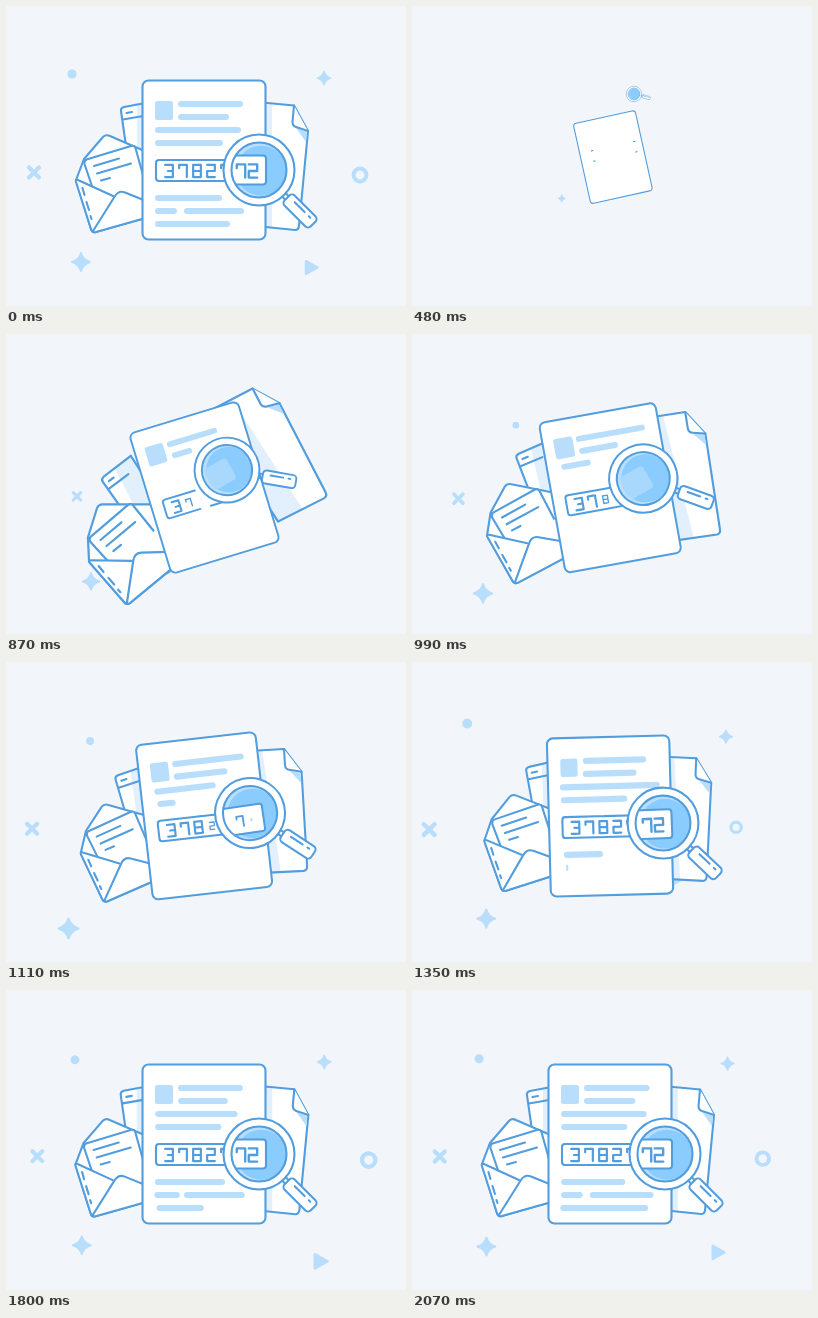
Animation, 400 px wide and 300 px high, one loop 2.1 s. Source, as an HTML page with a canvas:

```html
<!DOCTYPE html>
<html>
<head>
<meta charset="utf-8">
<style>
html, body { margin: 0; width: 100%; height: 100%; overflow: hidden; background: #f2f6fb; }
canvas { display: block; width: 400px; height: 300px; }
</style>
</head>
<body>
<canvas width="400" height="300"></canvas>
<script>
const LOOP = 2100, STAGGER = 145;
const PAPER = '#f2f6fb', BLUE = '#529dde', LIGHT = '#b9defb', SHADE = '#e2effc', GLASS = '#8accfe';
const ctx = document.querySelector('canvas').getContext('2d');
const clamp = v => Math.max(0, Math.min(1, v));

// Rises past 1, then rings out.
function spring(t, start, rise, over) {
  const v = (t - start) / rise, u = (t - start - rise) / 1000;
  if (v <= 0) return 0;
  if (v < 1) return (1 + over) * (1 - (1 - v) ** 1.4);
  return 1 + over * Math.exp(-3 * u) * Math.cos(6 * u);
}

// Soft start, then an exponential approach to 1.
const approach = (t, start, rate) => 1 - Math.exp(-rate * Math.max(0, (t - start) / 1000) ** 1.3);

// Smooth monotone curve through one value per beat.
const beats = [240, 480, 870, 1110, 1350, 1590];
function curve(t, values) {
  const last = beats.length - 1;
  if (t <= beats[0]) return values[0];
  if (t >= beats[last]) return values[last];
  const rate = k => (values[k + 1] - values[k]) / (beats[k + 1] - beats[k]);
  const slope = k => {
    if (k === 0 || k === last || rate(k - 1) * rate(k) <= 0) return 0;
    return 2 * rate(k - 1) * rate(k) / (rate(k - 1) + rate(k));
  };
  const i = beats.findIndex(b => b > t) - 1, h = beats[i + 1] - beats[i];
  const u = (t - beats[i]) / h, w = 1 - u;
  return values[i] * w * w * (1 + 2 * u) + values[i + 1] * u * u * (3 - 2 * u)
    + h * u * w * (slope(i) * w - slope(i + 1) * u);
}

const spin = t => curve(t, [-360, -193, -17, -6.5, -1.5, 0]);

// Maps the rest position (ox, oy) to (x, y), turned and scaled about it.
function place(x, y, degrees, scale, ox = 0, oy = 0) {
  const a = degrees * Math.PI / 180, c = Math.cos(a) * scale, s = Math.sin(a) * scale;
  ctx.setTransform(c, s, -s, c, x - c * ox + s * oy, y - s * ox - c * oy);
}

function shape(d, fill, stroke = BLUE, width = 2.1) {
  const path = new Path2D(d);
  if (fill) { ctx.fillStyle = fill; ctx.fill(path); }
  if (stroke) { ctx.strokeStyle = stroke; ctx.lineWidth = width; ctx.stroke(path); }
}

function rounded(x, y, w, h, r) {
  const path = new Path2D();
  path.roundRect(x, y, w, h, r);
  return path;
}

function circle(x, y, r) {
  const path = new Path2D();
  path.arc(x, y, r, 0, 7);
  return path;
}

function sparkle(x, y, r) {
  const k = r * .22;
  return `M${x} ${y - r}Q${x + k} ${y - k} ${x + r} ${y}Q${x + k} ${y + k} ${x} ${y + r}`
    + `Q${x - k} ${y + k} ${x - r} ${y}Q${x - k} ${y - k} ${x} ${y - r}Z`;
}

const ornaments = [
  () => shape(sparkle(75, 256, 9), LIGHT, LIGHT, 2),
  () => shape('M23 161.5l10 10m0-10l-10 10', null, LIGHT, 4.2),
  () => shape(circle(66, 68, 4.6), LIGHT, null),
  () => shape(sparkle(318, 72, 6.6), LIGHT, LIGHT, 1.6),
  () => shape(circle(354, 169, 6.4), null, LIGHT, 4),
  () => shape('M300 255L311.5 261.5L300 268Z', LIGHT, LIGHT, 2.5)
];

function drawOrnaments(t) {
  ornaments.forEach((paint, i) => {
    const s = spring(t, 240 + STAGGER * i, 870, .1);
    place(200, 150, 0, s, 200, 150);
    if (s) paint();
  });
}

const glyphs = {
  2: 'M-3.5-5.5H3.5V0H-3.5V5.5H3.5',
  3: 'M-3.5-5.5H3.5V5.5H-3.5M-1 0H3.5',
  7: 'M-3.5-2.5V-5.5H3.5V5.5',
  8: 'M-3.5-5.5H3.5V5.5H-3.5ZM-3.5 0H3.5'
};

function digit(t, char, x, y, start, size) {
  const s = size * clamp((t - start) / 200);
  if (!s) return;
  ctx.save();
  ctx.translate(x, y);
  ctx.scale(s, s);
  shape(glyphs[char], null, BLUE, 2);
  ctx.restore();
}

// A sheet behind the page, with the page's soft shade falling on it.
function sheet(d) {
  shape(d, '#fff', null);
  ctx.save();
  ctx.clip(new Path2D(d));
  ctx.fillStyle = SHADE;
  ctx.fillRect(131, 70, 135, 170);
  ctx.restore();
  shape(d);
}

function drawBack(t) {
  const scale = spring(t, 500, 300, .07);
  if (!scale) return;
  const trail = lag => place(198, 154, spin(t - lag), scale, 198, 154);

  trail(60);
  sheet('M150 95L118 101Q114.500 102 115 105L130 210L160 205Z');
  shape('M117 113.500L140 109.500M120.500 107L126 106');

  trail(80);
  sheet('M240 95L288 99.500L302 125L293 220Q292.500 224 289 224L240 219Z');
  shape('M290 122L301 126L300 136Z', LIGHT, null);
  shape('M288 99.500L286.500 116Q286.500 120 290 121L302 125', '#fff');

  trail(45);
  shape('M70 174L78 153L97 131Q100 128 104 130L150 150L150 209L90 226Q86 227 85 223Z', '#fff');
  shape('M80.500 153.500L125 140Q128.500 139 129.500 142L140 180L112 198L88 186L78.500 158Q78 154.500 80.500 153.500Z', '#fff');
  shape('M88 160L113 152.500M91 167.500L125 157.500M95 174.500L104 172');
  shape('M70 174L110 191L150 165V209L90 226Q86 227 85 223Z', '#fff', null);
  shape('M107 190L72 174Q69 173 70 176L85 223Q86 227 90 226L150 209');
  shape('M87 225L109 190Q113 184 119 186.500L150 199', '#fff');
  shape('M76.500 182L78.500 189M80.500 196L83 204M84.500 210L85.500 213');
}

// x, y and length of each text line, in order of appearance.
const lines = [
  [-26, -56, 65], [-26, -43, 51], [-49, -30, 86], [-49, -17, 68],
  [-49, 38, 67], [-49, 51, 22], [-20, 51, 60], [-49, 64, 75]
];

function drawPage(t) {
  const scale = approach(t, 240, 4.6);
  place(198 + 6 * (1 - scale), 154 - 6 * (1 - scale), spin(t), scale);
  shape(rounded(-61.500, -79.500, 123, 159, 6), '#fff');

  const a = spring(t, 470, 440, .18);
  shape(rounded(-40 - 9 * a, -49.500 - 9.500 * a, 18 * a, 19 * a, 2.5 * a), LIGHT, null);
  lines.forEach(([x, y, length], i) => {
    const g = spring(t, 600 + STAGGER * i, 440, .18);
    shape(rounded(x + 4 * (1 - g), y - 3.1, length * g, 6.2, 3), LIGHT, null);
  });

  // The number box grows inwards from its four corners.
  const reach = 44 * clamp((t - 450) / 500), drop = Math.min(reach / 3, 10.5);
  const box = new Path2D();
  if (reach) for (const sx of [-1, 1]) for (const sy of [-1, 1]) {
    const x = -5 + 43 * sx, y = 10.5 + 10.5 * sy;
    box.moveTo(x - sx * reach, y);
    box.arcTo(x, y, x, y - sy * drop, Math.min(3, drop));
    box.lineTo(x, y - sy * drop);
  }
  shape(box);
  [...'37827'].forEach((c, i) => digit(t, c, -35 + 14 * i, 11, 600 + 130 * i, 1.1));
}

function drawLens(t) {
  const scale = approach(t, 400, 6.5);
  if (!scale) return;
  const x = curve(t, [222, 222, 221, 244, 251, 253]);
  const y = curve(t, [88, 88, 136, 151, 161, 164]);
  const angle = curve(t, [15, 15, 10, 33, 43.5, 45]);

  place(x, y, angle, scale);
  shape('M35-2.500H41M35 2.500H41', '#fff');
  shape(rounded(39.500, -7.200, 37, 14.400, 4), '#fff');
  shape('M48-2.500H62M68-2.500H70');
  shape(circle(0, 0, 35.500), '#fff');

  ctx.save();
  ctx.clip(circle(0, 0, 27.500));
  shape(circle(0, 0, 28), LIGHT, null);
  shape(circle(2, -1, 25), GLASS, null);
  if (t < 1000) {
    place(x - 7, y + 4, -30, scale * clamp((t - 500) / 200));
    shape(rounded(-14, -13, 28, 26, 4), '#a9d8fd', null);
  } else {
    place(198, 154, spin(t - 60), approach(t, 600, 7));
    shape(rounded(-40, -4.500, 102, 29, 3), '#fff');
    digit(t, 7, 37, 11, 950, 1.2);
    digit(t, 2, 49, 11, 1080, 1.2);
  }
  ctx.restore();

  place(x, y, angle, scale);
  shape(circle(0, 0, 27.500));
}

function draw(t) {
  ctx.setTransform(1, 0, 0, 1, 0, 0);
  ctx.fillStyle = PAPER;
  ctx.fillRect(0, 0, 400, 300);
  if (t >= 30 && t <= 240) return;
  if (t < 30) t = 4000; // the settled picture shows briefly before the restart
  ctx.lineCap = ctx.lineJoin = 'round';
  drawOrnaments(t);
  drawBack(t);
  drawPage(t);
  drawLens(t);
}

const begin = performance.now();
function frame() {
  draw((performance.now() - begin) % LOOP);
  requestAnimationFrame(frame);
}
frame();
</script>
</body>
</html>
```
